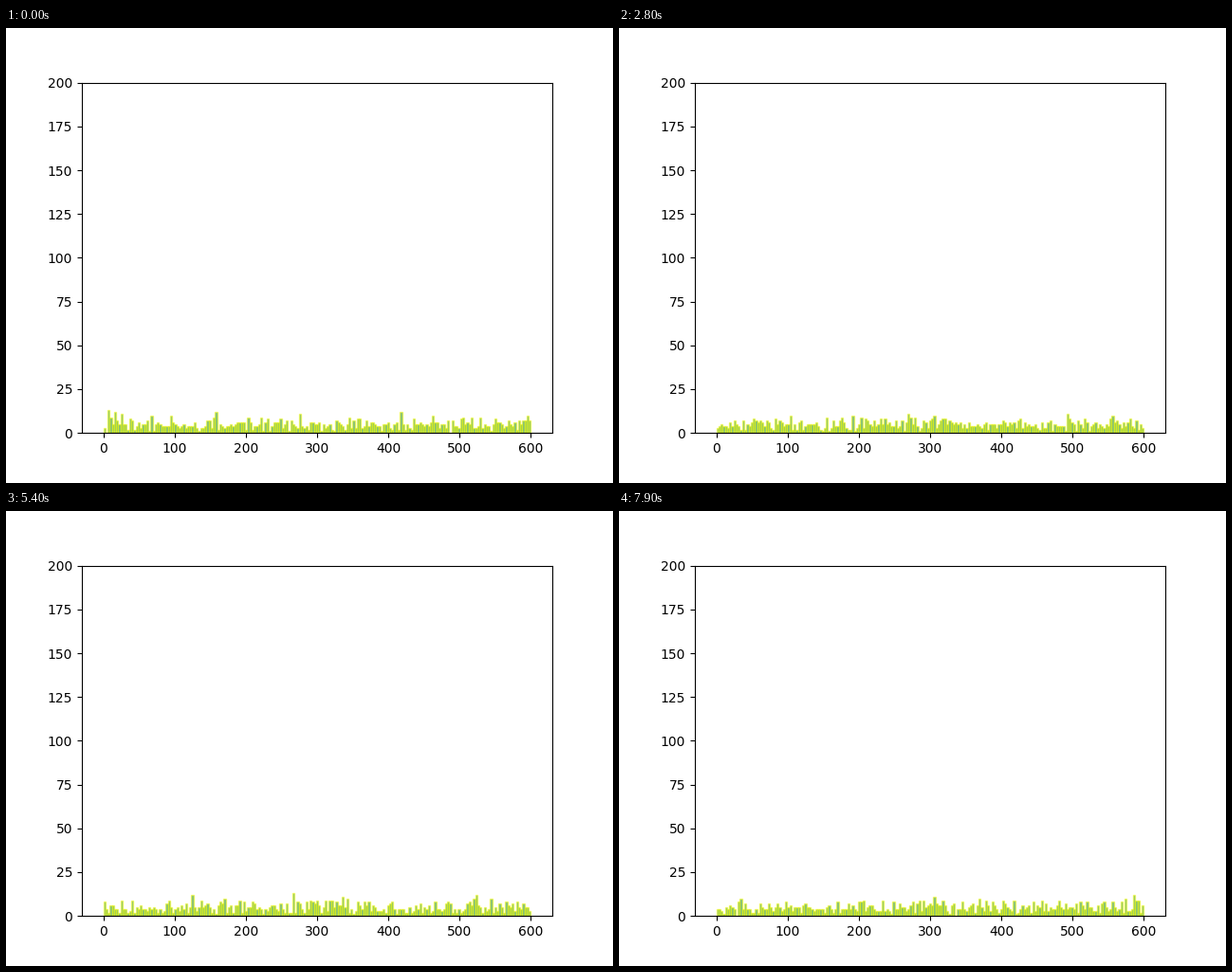
Animation of 640x480 px, one loop 8 s. Source, as a matplotlib script:

```python
import numpy as np
import matplotlib.pyplot as plt
from matplotlib.animation import FuncAnimation

SEED = 19680801
FRAMES = 80
INTERVAL = 100
SAMPLES = 1000
BINS = np.linspace(0, 600, 200)


def counts(frame):
    """Histogram of a fresh uniform sample for the given frame."""
    rng = np.random.default_rng(SEED + frame)
    return np.histogram(rng.uniform(0, 600, SAMPLES), BINS)[0]


fig, ax = plt.subplots(figsize=(6.4, 4.8), dpi=100)
bars = ax.bar(BINS[:-1], counts(0), width=np.diff(BINS), align="edge",
              lw=1, ec="yellow", fc="green", alpha=0.5)
ax.set_xlim(-30, 630)
ax.set_ylim(0, 200)


def update(frame):
    for bar, n in zip(bars, counts(frame)):
        bar.set_height(n)
    return bars.patches


anim = FuncAnimation(fig, update, frames=FRAMES, interval=INTERVAL,
                     init_func=lambda: update(0), repeat=True,
                     repeat_delay=0, blit=False)

plt.show()
```
